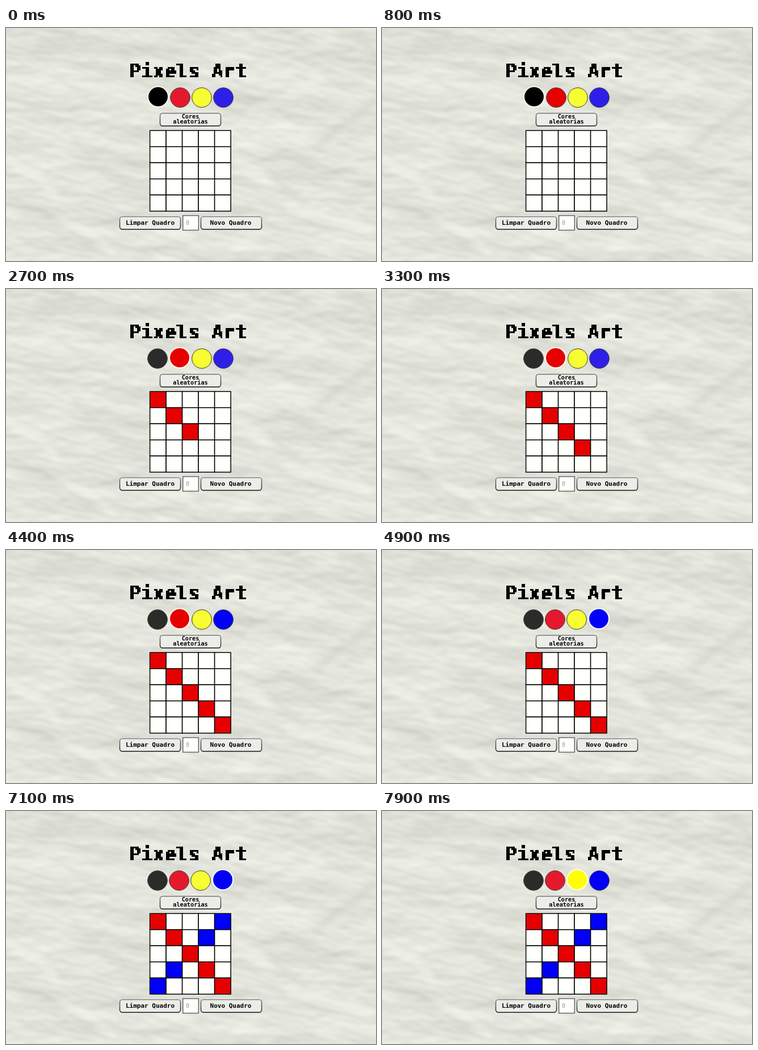
An HTML page that plays this animation: 652x412 px, repeating every 8000 ms.

```html
<!DOCTYPE html>
<html lang="pt">
<head>
<meta charset="utf-8">
<title>Pixels Art</title>
<style>
  html, body { margin: 0; width: 100%; height: 100%; overflow: hidden; background: #e2e3da; }
  svg { display: block; }
  text { font-family: "DejaVu Sans Mono", monospace; font-weight: bold; }
  .label { font-size: 11px; text-anchor: middle; }
  .small { font-size: 10.2px; }
  .title { font-size: 34.5px; stroke: #000; stroke-width: .5; }
  .hint { font: 10px "DejaVu Sans Mono", monospace; fill: #999; }
  .button { fill: #ecede8; stroke: url(#edge); stroke-width: 1.4; }
</style>
</head>
<body>
<svg width="652" height="412" viewBox="0 0 652 412">
  <defs>
    <linearGradient id="edge" x1="0" y1="0" x2="0" y2="1">
      <stop offset="0" stop-color="#777"/><stop offset="1" stop-color="#151515"/>
    </linearGradient>
    <filter id="paper" x="-200" y="-250" width="1100" height="950" filterUnits="userSpaceOnUse" color-interpolation-filters="sRGB">
      <feTurbulence type="fractalNoise" baseFrequency=".006 .013" numOctaves="4" seed="11"/>
      <feDiffuseLighting surfaceScale="2.8" diffuseConstant="1.05" lighting-color="#f9faf0">
        <feDistantLight azimuth="250" elevation="60"/>
      </feDiffuseLighting>
      <feGaussianBlur stdDeviation=".8"/>
    </filter>
    <filter id="soft" x="-100" y="-100" width="860" height="620" filterUnits="userSpaceOnUse">
      <feGaussianBlur stdDeviation="6"/>
    </filter>
    <filter id="pixelate" x="210" y="51" width="225" height="48" filterUnits="userSpaceOnUse">
      <feFlood x="211" y="52" width="1" height="1" result="dot"/>
      <feComposite in="dot" in2="dot" operator="over" x="210" y="51" width="3" height="3"/>
      <feTile result="dots"/>
      <feComposite in="SourceGraphic" in2="dots" operator="in"/>
      <feComponentTransfer><feFuncA type="discrete" tableValues="0 1"/></feComponentTransfer>
      <feMorphology operator="dilate" radius="1"/>
    </filter>
  </defs>
  <rect x="-200" y="-250" width="1100" height="950" filter="url(#paper)" transform="rotate(10 326 206)"/>
  <g id="creases" filter="url(#soft)" fill="none" stroke-linecap="round"/>

  <text class="title" x="217" y="88" filter="url(#pixelate)">Pixels Art</text>
  <g id="palette"></g>
  <rect class="button" x="271.5" y="150.8" width="107" height="22.4" rx="4.5"/>
  <text class="label small" x="325" y="160">Cores</text>
  <text class="label small" x="325" y="169">aleatorias</text>
  <g id="board" stroke="#000" stroke-width="1.5"></g>
  <rect class="button" x="200.5" y="333.6" width="107" height="22.4" rx="4.5"/>
  <text class="label" x="254" y="347.5">Limpar Quadro</text>
  <rect x="311.7" y="331.7" width="27.6" height="25.8" fill="#fefefb" stroke="#666" stroke-width="1.5"/>
  <text class="hint" x="317" y="348">0</text>
  <rect class="button" x="343.5" y="333.6" width="107" height="22.4" rx="4.5"/>
  <text class="label" x="396" y="347.5">Novo Quadro</text>
</svg>
<script>
const LOOP = 8000, FADE = 200;
const colors = ['#000', '#e60000', '#ffff00', '#0000fa'];
const dimmed = ['#2b2c29', '#e5192d', '#f7ff33', '#2e1fe8'];
const BLACK = 0, RED = 1, YELLOW = 2, BLUE = 3;

// [time, color] for pointer entry and for selection
const hovers = [[700, RED], [4400, BLUE], [7600, YELLOW]];
const picks = [[0, BLACK], [1000, RED], [4700, BLUE], [7900, YELLOW]];
// [time, row, column, color]
const strokes = [
  [1700, 0, 0, RED], [2200, 1, 1, RED], [2700, 2, 2, RED], [3300, 3, 3, RED], [3900, 4, 4, RED],
  [5400, 0, 4, BLUE], [5900, 1, 3, BLUE], [6500, 3, 1, BLUE], [7100, 4, 0, BLUE]
];
// [x1, y1, x2, y2, width, tone]; tone > 0 is light
const folds = [
  [0, 232, 90, 300, 12, 1], [10, 300, 100, 350, 9, -1], [90, 335, 190, 400, 10, 1],
  [60, 30, 210, 48, 14, -1], [0, 92, 240, 112, 8, 1], [120, 205, 250, 250, 10, -1],
  [410, 235, 465, 285, 20, 1], [455, 285, 520, 300, 10, -1], [500, 325, 640, 360, 12, 1],
  [550, 205, 650, 130, 12, -1], [430, 150, 560, 90, 10, 1], [590, 10, 650, 45, 14, -1]
];

const NS = 'http://www.w3.org/2000/svg';
const $ = id => document.getElementById(id);
function set(node, attrs) {
  for (const key in attrs) node.setAttribute(key, attrs[key]);
  return node;
}
const add = (parent, tag, attrs) =>
  parent.appendChild(set(document.createElementNS(NS, tag), attrs));

for (const [x1, y1, x2, y2, width, tone] of folds) {
  add($('creases'), 'path', {
    d: `M${x1} ${y1}Q${(x1 + x2) / 2 + 12} ${(y1 + y2) / 2 - 8} ${x2} ${y2}`,
    stroke: tone > 0 ? '#fafced' : '#b9bbb0', 'stroke-width': width, opacity: tone > 0 ? 0.5 : 0.3
  });
}

const dots = colors.map(() => add($('palette'), 'circle', {}));
const cells = Array.from({ length: 25 }, (_, i) => add($('board'), 'rect', {
  x: 253.6 + 28.5 * (i % 5), y: 181.3 + 28.5 * Math.floor(i / 5), width: 28.5, height: 28.5
}));

// 1 is the full color, 0 the dimmed one
function strength(index, picked, t) {
  if (index === picked) return 1;
  if (hovers.some(([time, c], i) => c === index && t >= time && t < picks[i + 1][0])) return 1;
  const left = picks.findIndex(([, c]) => c === index) + 1;
  const since = left > 0 && left < picks.length ? t - picks[left][0] : -1;
  return since < 0 ? 0 : Math.max(0, 1 - since / FADE);
}

function render(t) {
  const picked = picks.filter(([time]) => time <= t).pop()[1];
  let left = 249;
  dots.forEach((dot, i) => {
    const on = i === picked, size = on ? 38 : 36;
    set(dot, {
      cx: left + size / 2, cy: on ? 121.5 : 123, r: on ? 18 : 17.3,
      stroke: on ? '#fffff2' : '#333', 'stroke-width': on ? 2 : 1
    });
    dot.style.fill = `color-mix(in srgb, ${colors[i]} ${strength(i, picked, t) * 100}%, ${dimmed[i]})`;
    left += size + 2;
  });
  cells.forEach(cell => set(cell, { fill: '#fffffc' }));
  for (const [time, row, col, color] of strokes) {
    if (t >= time) set(cells[row * 5 + col], { fill: colors[color] });
  }
}

const start = performance.now();
function tick() {
  render((performance.now() - start) % LOOP);
  requestAnimationFrame(tick);
}
tick();
</script>
</body>
</html>
```
